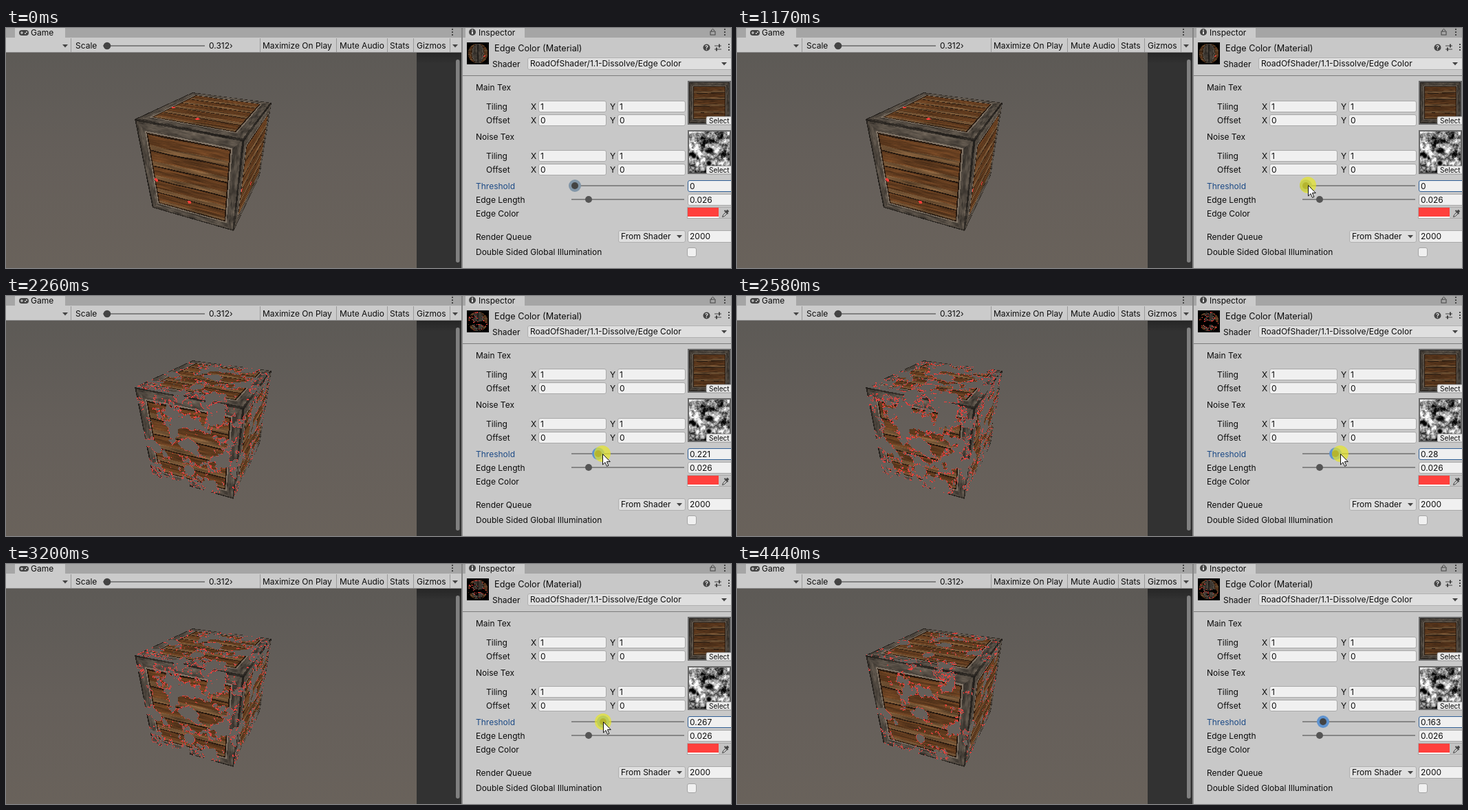
Recreate the animation shown at these times as an HTML page with a canvas. Size 1054x350 px, loop 4.9 s.

```html
<!DOCTYPE html>
<html lang="en">
<head>
<meta charset="utf-8">
<title>Dissolve edge color</title>
<style>
  html, body { margin: 0; width: 1054px; height: 350px; overflow: hidden; background: #c8c8c8; }
  canvas, svg { position: absolute; left: 0; top: 0; display: block; }
  text { font-family: Inter, "Liberation Sans", sans-serif; white-space: pre; }
</style>
</head>
<body>
<canvas id="view" width="1054" height="350"></canvas>
<svg id="ui" width="1054" height="350" viewBox="0 0 1054 350"></svg>
<script>
const LOOP = 4900, STEP = 78, EDGE = 0.026;
const RED = [255, 62, 58];
const ctx = document.getElementById('view').getContext('2d');
const ui = document.getElementById('ui');
const clamp = (v, lo, hi) => Math.min(hi, Math.max(lo, v));
const fract = v => v - Math.floor(v);
const bell = (d2, r) => Math.exp(-d2 / (2 * r * r));

// ---- procedural textures ----
const hash = (x, y) => fract(Math.sin(x * 127.1 + y * 311.7) * 43758.5453);

function valueNoise(x, y) {
  const i = Math.floor(x), j = Math.floor(y);
  const s = v => v * v * (3 - 2 * v);
  const fx = s(x - i), fy = s(y - j);
  const top = hash(i, j) * (1 - fx) + hash(i + 1, j) * fx;
  const low = hash(i, j + 1) * (1 - fx) + hash(i + 1, j + 1) * fx;
  return top * (1 - fy) + low * fy;
}

function fbm(x, y, octaves, fade = .58) {
  let sum = 0, total = 0, amp = 1;
  for (let o = 0; o < octaves; o++) {
    sum += amp * valueNoise(x + o * 17.3, y + o * 9.1);
    total += amp;
    amp *= fade; x *= 2; y *= 2;
  }
  return sum / total;
}

// Large features of the cloud texture: u, v, height, radius
const FEATURES = [
  [.49, .85, -.15, .05], [.46, .50, -.17, .06], [.08, .56, -.14, .05], [.05, .17, -.12, .04],
  [.81, .15, -.15, .05], [.42, .97, -.13, .05], [.34, .22, -.05, .07], [.86, .74, -.05, .07],
  [.75, .32, .1, .08], [.63, .63, .11, .07], [.97, .97, .18, .07], [.18, .85, .1, .07],
  [.97, .06, .14, .06], [.04, .03, .16, .06], [.14, .36, .1, .06]
];
const PITS = [[.12, .59], [.49, .77]];

function cloud(u, v) {
  let n = .315 + 1.05 * (fbm(u * 9 + 3, v * 9 + 8, 5, .66) - .5);
  for (const [x, y, h, r] of FEATURES) n += h * bell((u - x) ** 2 + (v - y) ** 2, r);
  if (n < .12) n = .05 + .07 * Math.exp((n - .12) / .07);
  for (const [x, y] of PITS) n = Math.min(n, EDGE * ((u - x) ** 2 + (v - y) ** 2) / .02 ** 2);
  return n;
}

function crate(u, v) {
  const d = Math.min(u, 1 - u, v, 1 - v);
  const scale = (c, k) => c.map(x => x * k);
  if (d < .1) {
    const along = Math.min(u, 1 - u) < Math.min(v, 1 - v) ? fbm(u * 40, v * 12, 3) : fbm(u * 12, v * 40, 3);
    let k = .45 + along;
    if (d < .014) k *= .55;
    if (d > .087) k = 1.25 + .5 * along;
    return scale([84, 76, 67], k);
  }
  const row = (v - .1) / .8 * 5 + .12 * (valueNoise(u * 3, v * 5) - .5);
  const f = fract(row);
  const grain = .55 + .9 * fbm(u * 5 + Math.floor(row) * 7, v * 60, 3);
  if (d < .112) return scale([40, 26, 16], grain);
  if (f < .08) return scale([40, 26, 16], grain);
  return scale(f > .7 ? [112, 81, 51] : [98, 60, 31], grain);
}

// ---- geometry ----
// Returns a function from a screen point to u, v inside a perspective quad.
function quad([x0, y0], [x1, y1], [x2, y2], [x3, y3]) {
  const ax = x1 - x2, ay = y1 - y2, bx = x3 - x2, by = y3 - y2;
  const sx = x0 - x1 + x2 - x3, sy = y0 - y1 + y2 - y3, den = ax * by - bx * ay;
  const g = (sx * by - bx * sy) / den, h = (ax * sy - sx * ay) / den;
  const a = x1 - x0 + g * x1, b = x3 - x0 + h * x3, c = x0;
  const d = y1 - y0 + g * y1, e = y3 - y0 + h * y3, f = y0;
  return (x, y) => {
    const w = (d * h - e * g) * x + (b * g - a * h) * y + a * e - b * d;
    const u = ((e - f * h) * x + (c * h - b) * y + b * f - c * e) / w;
    const v = ((f * g - d) * x + (a - c * g) * y + c * d - a * f) / w;
    return u >= 0 && u <= 1 && v >= 0 && v <= 1 ? [u, v] : null;
  };
}

const A = [187, 133], B = [346, 163], C = [386, 109], D = [271, 94];
const E = [213, 262], F = [331, 296], G = [369, 215];
const faces = [quad(A, B, F, E), quad(D, C, B, A), quad(B, C, G, F)];

function onBox(x, y) {
  for (const face of faces) {
    const hit = face(x, y);
    if (hit) return hit;
  }
  return null;
}

function onBall(x, y) {
  const px = (x - 686) / 14.5, py = (y - 37) / 14.5;
  if (px * px + py * py > 1) return null;
  const lat = Math.asin(py);
  return [fract(Math.asin(clamp(px / Math.cos(lat), -1, 1)) / (2 * Math.PI)), .5 + lat / Math.PI];
}

const onRect = (x0, y0, w, h) => (x, y) => [(x - x0) / w, (y - y0) / h];

// A block of pixels whose colours and noise heights are worked out once.
function patch(x0, y0, w, h, locate, color) {
  const canvas = document.createElement('canvas');
  canvas.width = w; canvas.height = h;
  const pen = canvas.getContext('2d'), image = pen.createImageData(w, h);
  const cells = [];
  for (let i = 0; i < w * h; i++) {
    const uv = locate(x0 + i % w + .5, y0 + Math.floor(i / w) + .5);
    if (uv) cells.push({ at: i * 4, rgb: color(...uv), height: cloud(...uv) });
  }
  return threshold => {
    for (const { at, rgb, height } of cells) {
      image.data.set(height < threshold + EDGE ? RED : rgb, at);
      image.data[at + 3] = height < threshold ? 0 : 255;
    }
    pen.putImageData(image, 0, 0);
    ctx.drawImage(canvas, x0, y0);
  };
}

const dim = k => (u, v) => crate(u, v).map(c => c * k);
const paintBox = patch(187, 93, 200, 205, onBox, crate);
const paintBall = patch(670, 21, 32, 32, onBall, dim(.8));
const paintMainTex = patch(993, 79, 59, 60, onRect(993, 79, 59, 60), dim(.85));
const paintNoiseTex = patch(993, 151, 59, 60, onRect(993, 151, 59, 60),
  (u, v) => Array(3).fill(255 * clamp((cloud(u, v) - .06) / .46, 0, 1)));

function fade(...colors) {
  const gradient = ctx.createLinearGradient(0, 36, 0, 350);
  colors.forEach(([stop, color]) => gradient.addColorStop(stop, color));
  return gradient;
}
const sky = fade([0, '#5d5a56'], [.5, '#655f5a'], [1, '#69625b']);
const backdrop = fade([0, '#262626'], [.05, '#323232']);

function fill(color, x, y, w, h) {
  ctx.fillStyle = color;
  ctx.fillRect(x, y, w, h);
}

function drawView(threshold) {
  fill('#c8c8c8', 0, 0, 1054, 350);
  fill(sky, 0, 36, 597, 314);
  fill(backdrop, 597, 36, 65, 314);
  fill('#000', 670, 21, 32, 32);
  paintBox(threshold);
  paintBall(threshold);
  fill('#6a6a6a', 991, 77, 63, 64);
  paintMainTex(-1);
  fill('#6a6a6a', 991, 149, 63, 64);
  paintNoiseTex(-1);
}

// ---- interface ----
const INK = '#0c0c0c', GREY = '#444';
const rect = (x, y, w, h, color, more = '') =>
  `<rect x="${x}" y="${y}" width="${w}" height="${h}" fill="${color}" ${more}/>`;
const text = (x, y, s, size = 12, color = INK, more = '') =>
  `<text x="${x}" y="${y}" font-size="${size}" fill="${color}" ${more}>${s}</text>`;
const dot = (x, y, r, color, more = '') => `<circle cx="${x}" cy="${y}" r="${r}" fill="${color}" ${more}/>`;
const path = (d, color, more = '') => `<path d="${d}" fill="${color}" ${more}/>`;
const stroke = (d, color = GREY, width = 1) => path(d, 'none', `stroke="${color}" stroke-width="${width}"`);
const field = (x, y, w, value, h = 17, border = '#a9a9a9') =>
  rect(x + .5, y + .5, w - 1, h - 1, '#f0f0f0', `rx="2.5" stroke="${border}"`) + text(x + 3, y + 13, value);
const popup = (x, y, w, value) =>
  rect(x + .5, y + .5, w - 1, 17, '#dfdfdf', 'rx="2.5" stroke="#b0b0b0"') + text(x + 4, y + 13, value);
const arrow = (x, y) => path(`M${x - 4} ${y - 2}h8l-4 4.5z`, GREY);
const kebab = (x, y) => [-4, 0, 4].map(d => rect(x - 1, y + d - 1, 2, 2, GREY)).join('');
const select = y => rect(1018, y, 40, 12, '#e9e9e9', 'rx="2" stroke="#777" stroke-width=".7"') + text(1022, y + 9.5, 'Select', 10);

const gamePanel = [
  rect(0, 0, 662, 14, '#a5a5a5'), rect(13, 0, 73, 15, '#cbcbcb'), rect(0, 14, 662, 21, '#cbcbcb'),
  rect(0, 35, 662, 1, '#8c8c8c'),
  rect(19, 3, 14, 8, GREY, 'rx="4"'), stroke('M21 7h4M23 5v4', '#ddd'), dot(28, 8, 1, '#ddd'), dot(30, 6, 1, '#ddd'),
  text(36, 11, 'Game'), kebab(649, 6), arrow(86, 26),
  ...[94, 369, 480, 554, 592, 645].map(x => rect(x, 15, 1, 20, '#999')),
  text(101, 30, 'Scale'), rect(141, 25, 148, 2, '#808080'), dot(147, 26, 5.3, GREY), text(295, 30, '0.312›'),
  text(373, 30, 'Maximize On Play'), text(485, 30, 'Mute Audio'), text(558, 30, 'Stats'),
  text(597, 30, 'Gizmos'), arrow(653, 26),
  rect(654, 46, 5.5, 296, '#808080', 'rx="2.7"'), rect(662, 0, 2, 350, '#858585')
];

const tilingRows = y => ['Tiling', 'Offset'].map((label, i) => {
  const row = y + i * 20, value = 1 - i;
  return text(698, row + 13, label) + text(763, row + 13, 'X') + field(774, row, 99, value) +
    text(878, row + 13, 'Y') + field(889, row, 99, value);
}).join('');

const inspector = [
  rect(664, 0, 390, 14, '#a5a5a5'), rect(668, 0, 86, 15, '#cbcbcb'),
  dot(678, 6, 5, GREY), rect(677, 5, 2, 4, '#ddd'), rect(677, 2.5, 2, 1.6, '#ddd'), text(687, 11, 'Inspector'),
  rect(1024, 5, 7, 5, 'none', `stroke="${GREY}"`), stroke('M1025.5 5V3q2-3 4 0v1'), kebab(1045, 6),
  text(710, 34, 'Edge Color (Material)', 12.7),
  dot(1018.5, 28.5, 5, GREY), text(1016, 32, '?', 9, '#e0e0e0', 'font-weight="700"'),
  stroke('M1030 26h10M1030 31h10', GREY, 1.2), stroke('M1037 23.5v5M1033 28.5v5', GREY, 2), kebab(1051, 28),
  text(707, 57, 'Shader'), popup(758, 43, 304, 'RoadOfShader/1.1-Dissolve/Edge Color'), arrow(1044, 52),
  rect(664, 69, 390, 1, '#7c7c7c'),
  text(683, 91, 'Main Tex'), tilingRows(106), select(129),
  text(683, 163, 'Noise Tex'), tilingRows(178), select(201),
  text(683, 235, 'Threshold', 12, '#1c4a86'), rect(822, 229, 164, 2, '#858585'),
  text(683, 255, 'Edge Length'), rect(822, 249, 164, 2, '#858585'), dot(847, 250, 5, '#555'), field(991, 242, 70, '0.026'),
  text(683, 275, 'Edge Color'), rect(990.5, 261.5, 70, 16, '#c4c4c4', 'stroke="#aaa"'),
  rect(991, 262, 45, 13, '#ff403d'), rect(991, 275, 45, 2, '#fff'),
  stroke('M1041.5 275.5l1-3 4-4 2 2-4 4z'), stroke('M1044.5 266l5 5', GREY, 2), stroke('M1047 269l3-3', GREY, 3.5),
  text(683, 309, 'Render Queue'), popup(890, 295, 98, 'From Shader'), arrow(979, 304), field(991, 295, 70, '2000', 18),
  text(683, 331, 'Double Sided Global Illumination'),
  rect(990.5, 320.5, 13, 13, '#f0f0f0', 'rx="2.5" stroke="#a5a5a5"')
];

const moving = `
  ${field(991, 222, 70, '', 17, '#305f96')}${text(994, 235, '0', 12, INK, 'id="value"')}
  <g id="knob">${dot(0, 230, 9, '#8296a8', 'id="halo"')}${dot(0, 230, 5, GREY)}</g>
  <g id="pointer">${dot(0, 0, 12, '#e6e626', 'id="press" opacity=".7"')}
  ${path('M.5 .5V16L4 12.6L6.5 18.3L8.9 17.3L6.4 11.6H11.3Z', '#fff', 'stroke="#111"')}</g>`;

ui.innerHTML = gamePanel.join('') + inspector.join('') + moving;
const part = Object.fromEntries(['value', 'knob', 'halo', 'pointer', 'press'].map(id => [id, document.getElementById(id)]));

// ---- motion ----
// Pointer path: step, x, y
const PATH = [
  [1, 993, 340], [4, 925, 290], [7, 877, 252], [10, 842, 234], [13, 830, 229], [18, 830, 229],
  [22, 851, 230], [25, 858, 230], [32, 873, 230], [33, 877, 230], [36, 880, 230], [39, 880, 230],
  [40, 871, 230], [41, 868, 230], [44, 855, 230], [51, 855, 230], [56, 994, 338]
];
const GRAB = 15, RELEASE = 52, GONE = 57;

function pointerAt(step) {
  const s = clamp(step, 1, 56);
  const i = Math.max(1, PATH.findIndex(p => p[0] >= s));
  const [s0, x0, y0] = PATH[i - 1], [s1, x1, y1] = PATH[i];
  const k = (s - s0) / (s1 - s0);
  return [Math.round(x0 + (x1 - x0) * k), Math.round(y0 + (y1 - y0) * k)];
}

const thresholdAt = step => (pointerAt(clamp(step, GRAB, RELEASE - 1))[0] - 830) / 153.5;
const show = (node, on) => node.setAttribute('visibility', on ? 'inherit' : 'hidden');

let lastStep = -1;
function render(ms) {
  const step = Math.floor((ms % LOOP + 8) / STEP);
  if (step === lastStep) return;
  lastStep = step;
  const shown = thresholdAt(step - 1); // the slider trails the pointer by one step
  drawView(thresholdAt(step));
  part.value.textContent = String(+shown.toFixed(3));
  part.knob.setAttribute('transform', `translate(${827 + shown * 153.5} 0)`);
  part.halo.setAttribute('fill', step < 19 ? '#8296a8' : '#5f93cf');
  part.pointer.setAttribute('transform', `translate(${pointerAt(step).join(' ')})`);
  show(part.pointer, step >= 1 && step < GONE);
  show(part.press, step >= GRAB && step < RELEASE);
}

const start = performance.now();
function tick() {
  render(performance.now() - start);
  requestAnimationFrame(tick);
}
tick();
</script>
</body>
</html>
```
